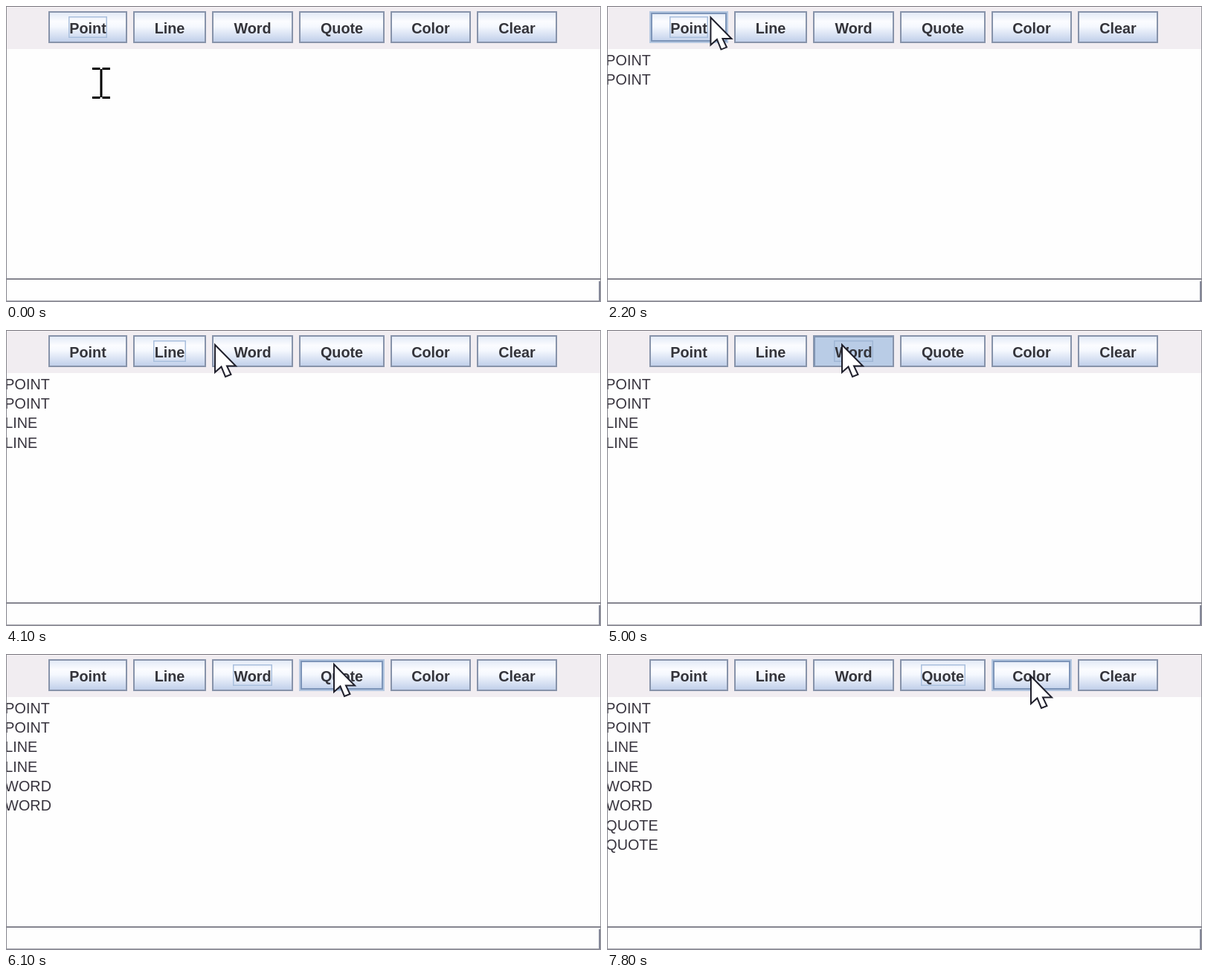
Write an HTML page with a canvas that moves like this. It is 800 px wide and 399 px high and loops after 8000 ms.

```html
<!DOCTYPE html>
<html lang="en">
<head>
<meta charset="utf-8">
<title>Button demo</title>
<style>
  html, body { margin: 0; width: 100%; height: 100%; overflow: hidden; background: #fefefe; }
  canvas { display: block; }
</style>
</head>
<body>
<canvas id="stage" width="800" height="399"></canvas>
<script>
const ctx = document.getElementById('stage').getContext('2d');
const LOOP = 8000, STEP = 100, PRESS = 100;
const TOP = 7, HEIGHT = 43;
const FONT = '"Liberation Sans", Arial, sans-serif';

const buttons = [
  ['Point', 57, 106], ['Line', 171, 98], ['Word', 277, 109],
  ['Quote', 394, 115], ['Color', 517, 108], ['Clear', 633, 108],
].map(([label, x, width]) => ({ label, x, width }));

// [press time, button index]
const clicks = [
  [1100, 0], [1800, 0], [3100, 1], [3600, 1],
  [5000, 2], [5400, 2], [6600, 3], [7100, 3],
];

// [time, x, y] of the pointer's hot spot
const path = [
  [0, 128, 104], [400, 100, 14], [2100, 100, 14], [2400, 252, 20],
  [3900, 252, 20], [4100, 281, 20], [4300, 316, 20], [5700, 316, 20],
  [6100, 441, 14], [7400, 441, 14], [7800, 570, 30], [LOOP, 570, 30],
];

const arrow = new Path2D('M0 0V37L8.5 29.5L14 43L21.5 40L16 28.5H28Z');

function rect(x, y, w, h, color) {
  ctx.fillStyle = color;
  ctx.fillRect(x, y, w, h);
}

function outline(x, y, w, h, color, line) {
  ctx.strokeStyle = color;
  ctx.lineWidth = line;
  ctx.strokeRect(x + line / 2, y + line / 2, w - line, h - line);
}

function pointerAt(time) {
  const i = path.findIndex(key => key[0] > time);
  const [t0, x0, y0] = path[i - 1], [t1, x1, y1] = path[i];
  const u = (time - t0) / (t1 - t0), k = u * u * (3 - 2 * u);
  return { x: x0 + (x1 - x0) * k, y: y0 + (y1 - y0) * k };
}

function drawButton({ label, x, width }, { focused, pressed, hovered }) {
  if (pressed) {
    rect(x, TOP, width, HEIGHT, '#b9cce6');
  } else {
    const shade = ctx.createLinearGradient(0, TOP, 0, TOP + HEIGHT);
    shade.addColorStop(0, '#dfe7f5');
    shade.addColorStop(0.32, '#fbfcff');
    shade.addColorStop(0.48, '#f5f8fe');
    shade.addColorStop(1, '#bccce8');
    rect(x, TOP, width, HEIGHT, shade);
  }
  if (hovered && !pressed) {
    outline(x, TOP, width, HEIGHT, '#b4c7e0', 2);
    outline(x + 2, TOP + 2, width - 4, HEIGHT - 4, '#7d95b9', 2);
  } else {
    outline(x, TOP, width, HEIGHT, '#8793aa', 2);
    if (pressed) {
      rect(x + 1, TOP + 1, width - 2, 2, '#8295b2');
      rect(x + 1, TOP + 1, 2, HEIGHT - 2, '#8295b2');
    }
  }
  ctx.font = `bold 19.8px ${FONT}`;
  ctx.textAlign = 'center';
  const middle = x + width / 2;
  if (focused) {
    const w = Math.round(ctx.measureText(label).width) + 3;
    outline(Math.round(middle - w / 2), 14, w, 29, pressed ? '#9fb6d5' : '#a9bfdd', 1.5);
  }
  ctx.fillStyle = '#34343a';
  ctx.fillText(label, middle, 37);
}

function drawPointer({ x, y }) {
  if (y > 58) {
    rect(x - 1.5, y - 19, 3, 38, '#000');
    for (const dy of [-21, 18]) {
      rect(x - 12, y + dy, 10.5, 3, '#000');
      rect(x + 1.5, y + dy, 10.5, 3, '#000');
    }
    return;
  }
  ctx.save();
  ctx.translate(x, y);
  ctx.fillStyle = '#fff';
  ctx.strokeStyle = '#20202c';
  ctx.lineWidth = 2;
  ctx.fill(arrow);
  ctx.stroke(arrow);
  ctx.restore();
}

function draw(time) {
  const pointer = pointerAt(time);
  const begun = clicks.filter(([start]) => time >= start);
  const [lastPress, focus] = begun.at(-1) || [-Infinity, 0];
  const pressing = time < lastPress + PRESS;

  rect(0, 0, 800, 399, '#fefefe');
  rect(0, 0, 800, 58, '#f1edf1');

  ctx.font = `19.8px ${FONT}`;
  ctx.textAlign = 'left';
  ctx.fillStyle = '#38343e';
  begun.filter(([start]) => time >= start + PRESS).forEach(([, index], row) =>
    ctx.fillText(buttons[index].label.toUpperCase(), -1.7, 79.5 + row * 26.35));

  // Window edges and the empty text field
  rect(0, 0, 800, 1, '#77757c');
  rect(0, 0, 1, 399, '#85858c');
  rect(799, 0, 1, 399, '#929299');
  rect(0, 367, 800, 2, '#85858f');
  rect(0, 397, 800, 2, '#92929b');
  rect(797, 371, 2, 27, '#85899a');

  buttons.forEach((button, i) => drawButton(button, {
    focused: i === focus,
    pressed: pressing && i === focus,
    hovered: pointer.y < TOP + HEIGHT &&
      pointer.x > button.x + 8 && pointer.x < button.x + button.width,
  }));
  drawPointer(pointer);
}

function frame() {
  const time = performance.now() % LOOP;
  draw(Math.floor(time / STEP) * STEP);
  requestAnimationFrame(frame);
}
frame();
</script>
</body>
</html>
```
